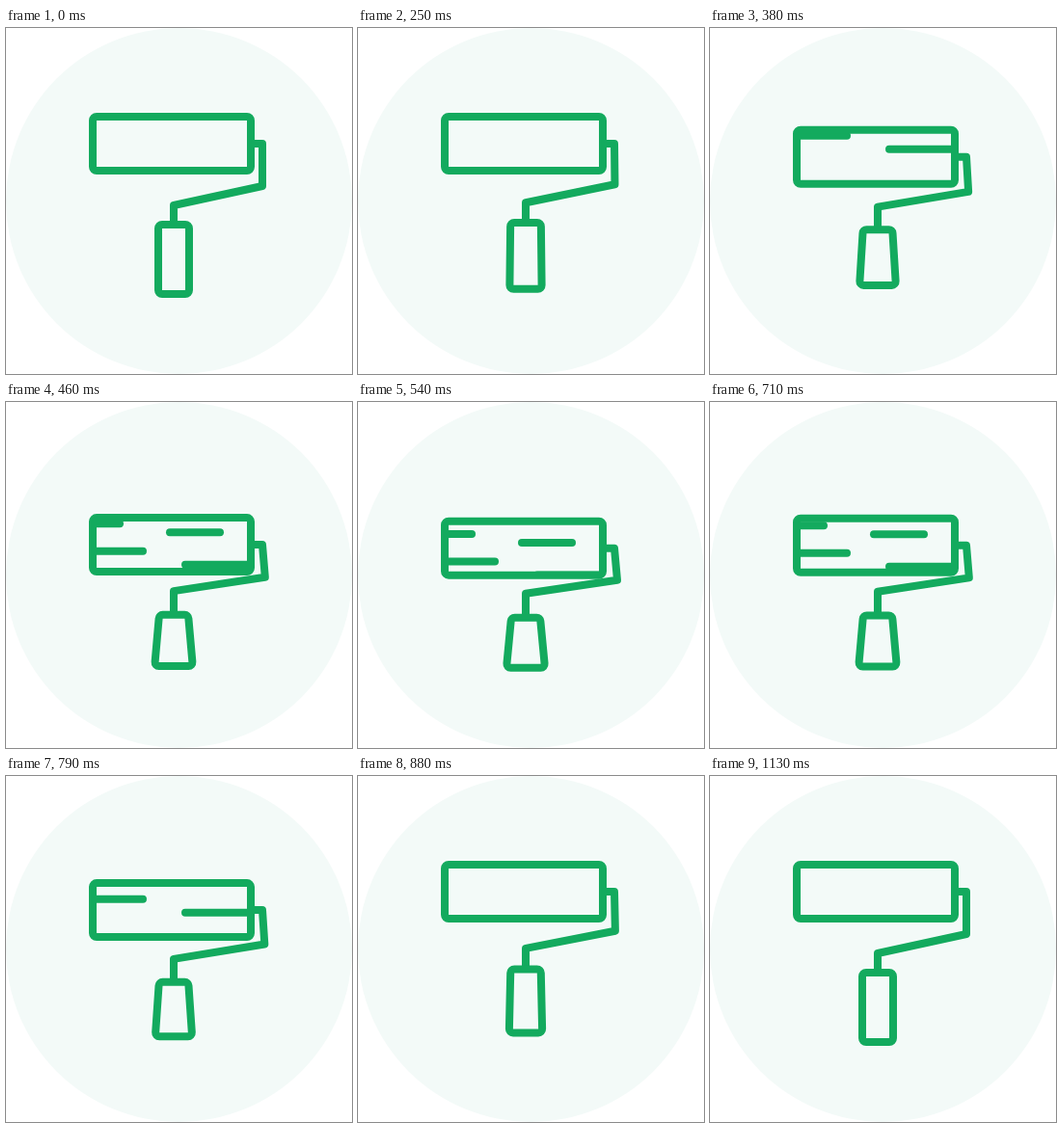
Animation, 359 px wide and 359 px high, one loop 1.18 s. Source, as an HTML page with a canvas:

```html
<!DOCTYPE html>
<html lang="en">
<head>
<meta charset="utf-8">
<title>Paint roller</title>
<style>
  html, body { margin: 0; width: 100%; height: 100%; overflow: hidden; background: #fff; }
  canvas { display: block; width: 100vw; height: 100vh; }
</style>
</head>
<body>
<canvas></canvas>
<script>
const SIZE = 359, LOOP = 1180, FPS = 24, LAST = 27;
const GREEN = '#13aa5e', PALE = '#f3faf8';
const PEAK = 14, END = 25, DROP = 32;

// Stripes on the roller: start x, end x, offset
const STRIPES = [[80, 118, -28.5], [170, 222, -19.5], [80, 142, 0], [186, 270, 14]];

const canvas = document.querySelector('canvas');
const ctx = canvas.getContext('2d');
const mix = (a, b, t) => a + (b - a) * t;

// Ease with control points (a, 0) and (b, 1)
function ease(x, a, b) {
  if (x <= 0) return 0;
  if (x >= 1) return 1;
  let lo = 0, hi = 1;
  for (let i = 0; i < 30; i++) {
    const u = (lo + hi) / 2, v = 1 - u;
    if (3 * v * v * u * a + 3 * v * u * u * b + u * u * u < x) lo = u; else hi = u;
  }
  return lo * lo * (3 - 2 * lo);
}

function pose(step) {
  const down = step <= PEAK;
  const squash = down
    ? ease(step / PEAK, 0.84, 0.38)
    : 1 - ease((step - PEAK) / (END - PEAK), 0.786, 0.407);
  const rest = down ? 0.5 : 0.45;
  const drop = DROP * Math.max(0, (squash - rest) / (1 - rest));
  return { squash, drop };
}

function line(points) {
  ctx.beginPath();
  points.forEach(([x, y]) => ctx.lineTo(x, y));
  ctx.stroke();
}

function rounded(points, radius) {
  const n = points.length, [a, b] = [points[n - 1], points[0]];
  ctx.beginPath();
  ctx.moveTo((a[0] + b[0]) / 2, (a[1] + b[1]) / 2);
  points.forEach((p, i) => ctx.arcTo(...p, ...points[(i + 1) % n], radius));
  ctx.closePath();
  ctx.stroke();
}

function draw({ squash: s, drop }) {
  ctx.fillStyle = '#fff';
  ctx.fillRect(0, 0, SIZE, SIZE);
  ctx.fillStyle = PALE;
  ctx.beginPath();
  ctx.arc(SIZE / 2, SIZE / 2, SIZE / 2, 0, 7);
  ctx.fill();

  ctx.strokeStyle = GREEN;
  ctx.lineWidth = 8;
  ctx.lineCap = 'round';
  ctx.lineJoin = 'round';
  ctx.save();
  ctx.translate(0, 88 + drop);

  ctx.save();
  ctx.beginPath();
  ctx.rect(90, 4, 164, 56);
  ctx.clip();
  for (const [x1, x2, dy] of STRIPES) {
    const y = 2 * drop - 17.5 + dy;
    line([[x1, y], [x2, y]]);
  }
  ctx.restore();

  rounded([[90, 4], [254, 4], [254, 60], [90, 60]], 4);

  const top = mix(116, 104, s), bottom = mix(188, 156, s);
  ctx.lineCap = 'butt';
  line([
    [254, 32], [266, 32],
    [mix(266, 269, s), mix(76, 65, s)],
    [174, mix(96, 79, s)], [174, top]
  ]);

  const upper = mix(16, 15, s), lower = mix(16, 20, s);
  rounded([
    [174 - upper, top], [174 + upper, top],
    [174 + lower, bottom], [174 - lower, bottom]
  ], 4);
  ctx.restore();
}

function frame(now) {
  const w = Math.round(innerWidth * devicePixelRatio);
  const h = Math.round(innerHeight * devicePixelRatio);
  if (canvas.width !== w || canvas.height !== h) {
    canvas.width = w;
    canvas.height = h;
  }
  ctx.setTransform(w / SIZE, 0, 0, h / SIZE, 0, 0);
  const step = Math.min(LAST, Math.floor((now % LOOP + 4) * FPS / 1000));
  draw(pose(step));
  requestAnimationFrame(frame);
}
frame(0);
</script>
</body>
</html>
```
